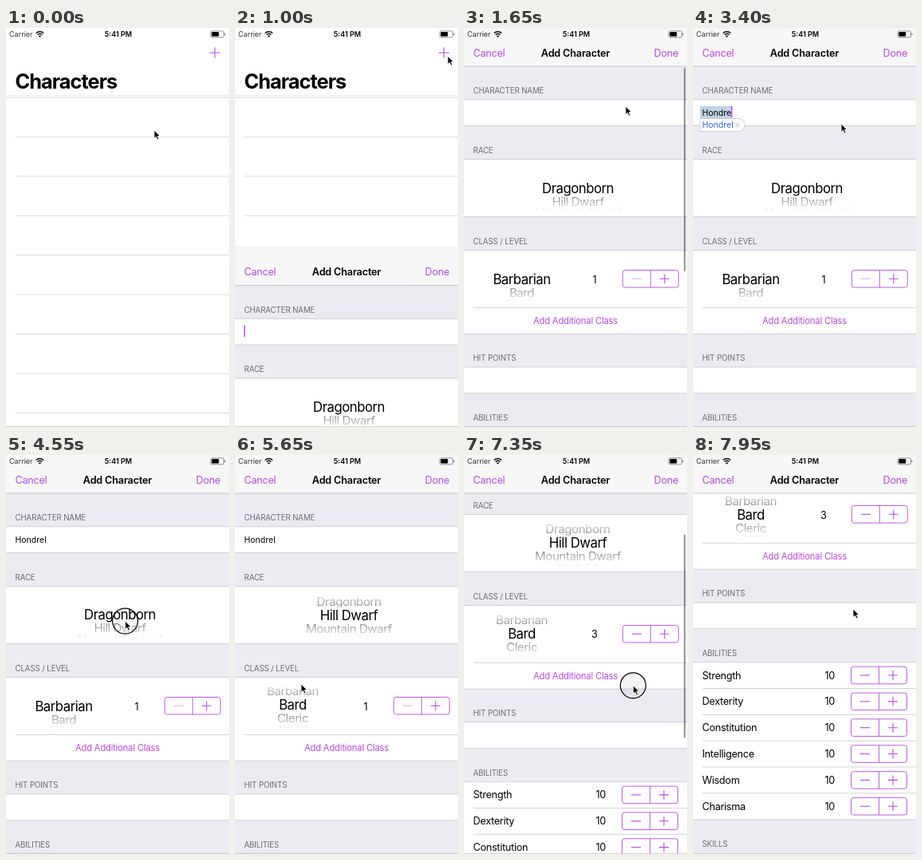
An HTML page that plays this animation: 280x500 px, repeating every 8 s.

```html
<!DOCTYPE html>
<html lang="en">
<head>
<meta charset="utf-8">
<title>Add Character</title>
<style>
html, body { margin: 0; width: 100%; height: 100%; overflow: hidden; background: #fff; }
svg { display: block; width: 280px; height: 500px; font-family: Inter, Roboto, sans-serif; }
text { white-space: pre; }
</style>
</head>
<body>
<svg id="stage" viewBox="0 0 280 500"></svg>
<script>
const LOOP = 8000;
const TINT = '#b84ae2', LINE = '#c8c7cc', HERO = 'Hondrel';
const stage = document.getElementById('stage');

function el(tag, attrs, parent = stage) {
  const node = document.createElementNS('http://www.w3.org/2000/svg', tag);
  set(node, attrs);
  parent.appendChild(node);
  return node;
}
function set(node, attrs) {
  for (const name in attrs) node.setAttribute(name, attrs[name]);
}
const show = (node, on) => set(node, { opacity: +on });
const move = (node, x, y) => set(node, { transform: `translate(${x} ${y})` });
const group = (parent, attrs = {}) => el('g', attrs, parent);
const rect = (parent, x, y, width, height, fill, attrs = {}) =>
  el('rect', { x, y, width, height, fill, ...attrs }, parent);
const path = (parent, d, stroke, width = 1, attrs = {}) =>
  el('path', { d, stroke, 'stroke-width': width, fill: 'none', ...attrs }, parent);
const rule = (parent, x, y, color = LINE) => rect(parent, x, y - 0.4, 280 - x, 0.8, color);

// Text whose capitals are vertically centred on cy.
function label(parent, str, x, cy, size, fill = '#000', spacing = 0, attrs = {}) {
  const node = el('text', { x, y: cy + size * 0.36, 'font-size': size, fill,
    'letter-spacing': spacing, ...attrs }, parent);
  node.textContent = str;
  return node;
}
const MID = { 'text-anchor': 'middle' }, END = { 'text-anchor': 'end' };

// Linear interpolation through [time, ...values] keys.
function track(keys, t) {
  if (t <= keys[0][0]) return keys[0].slice(1);
  for (let i = 1; i < keys.length; i++) {
    const a = keys[i - 1], b = keys[i];
    if (t < b[0]) {
      const p = (t - a[0]) / (b[0] - a[0]);
      return a.slice(1).map((v, j) => v + (b[j + 1] - v) * p);
    }
  }
  return keys[keys.length - 1].slice(1);
}
const within = (t, spans) => spans.some(([from, to]) => t >= from && t < to);

// Shared definitions for the picker wheels
const defs = el('defs', {});
const band = el('clipPath', { id: 'band' }, defs);
rect(band, -75, -10, 150, 20, '#000');
const rim = el('clipPath', { id: 'rim' }, defs);
rect(rim, -75, -35, 150, 25, '#000');
rect(rim, -75, 10, 150, 25, '#000');
const fade = el('linearGradient', { id: 'fade', x1: 0, y1: 0, x2: 0, y2: 1 }, defs);
[[0, 1], [0.1, 0.95], [0.36, 0.1], [0.64, 0.1], [0.9, 0.95], [1, 1]].forEach(([offset, alpha]) =>
  el('stop', { offset, 'stop-color': '#fff', 'stop-opacity': alpha }, fade));

function picker(parent, x, y, names) {
  const root = group(parent, { transform: `translate(${x} ${y})` });
  const outer = group(root, { 'clip-path': 'url(#rim)' });
  const word = (into, fill) => name => label(into, name, 0, 0, 16.8, fill, -0.5, MID);
  const far = names.map(word(outer, '#777'));
  rect(outer, -75, -35, 150, 70, 'url(#fade)');
  const near = names.map(word(group(root, { 'clip-path': 'url(#band)' }), '#000'));
  return pos => names.forEach((_, i) => {
    const k = i - pos, angle = k * 0.58;
    show(far[i], Math.abs(k) < 2.5);
    set(far[i], { transform: `translate(0 ${31 * Math.sin(angle)}) scale(0.9 ${Math.max(Math.cos(angle), 0.05)})` });
    move(near[i], 0, k * 20);
  });
}

function stepper(parent, x, cy) {
  const root = group(parent, { transform: `translate(${x} ${cy})` });
  const press = rect(root, 35, -10.8, 35, 21.6, TINT, { rx: 3, opacity: 0 });
  rect(root, 0, -10.8, 70, 21.6, 'none', { rx: 3, stroke: TINT, 'stroke-width': 0.9 });
  path(root, 'M35 -10.8v21.6', TINT, 0.9);
  const minus = path(root, 'M11.5 0h12', TINT, 1.1);
  path(root, 'M46.5 0h12M52.5 -6v12', TINT, 1.1);
  return { press, minus };
}

// Character list
const home = group(stage);
rect(home, 0, 0, 280, 500, '#fff');
label(home, 'Characters', 11.5, 66.5, 25.4, '#000', -1, { 'font-weight': 700 });
const plus = path(home, 'M255.5 31h13.5M262.2 24.2v13.5', TINT, 1.1);
rule(home, 0, 84.5, '#e6e6e8');
rule(home, 0, 87, LINE);
for (let i = 0; i < 8; i++) rule(home, 12, 136.3 + i * 49.45, '#d4d4d8');

// Form sheet
const sheet = group(stage);
rect(sheet, 0, 0, 280, 560, '#ebebf1');
const form = group(sheet);

function section(title, top, height) {
  label(form, title, 11.5, top - 11, 9.7, '#6d6d72', -0.1);
  rect(form, 0, top, 280, height, '#fff');
  rule(form, 0, top);
  rule(form, 0, top + height);
}
section('CHARACTER NAME', 89.8, 32.8);
section('RACE', 164.6, 71.8);
section('CLASS / LEVEL', 278.4, 104.8);
section('HIT POINTS', 425, 32.8);
section('ABILITIES', 499.8, 197.2);
label(form, 'SKILLS', 11.5, 728, 9.7, '#6d6d72', -0.1);

const mark = rect(form, 9, 98, 0, 15, '#bfd2e4');
const nameText = label(form, '', 11.5, 105.8, 10.5);
const caret = rect(form, 0, 98, 1.5, 14.5, TINT);
const bubble = group(form);
path(bubble, 'M9 113.5H57a8 8 0 0 1 0 16H9Z', '#c4c4c8', 0.8, { fill: '#fff' });
label(bubble, HERO, 11.5, 121.5, 10.5, '#2c6bd0');
path(bubble, 'M53.5 119l5 5M58.5 119l-5 5', '#aaa', 0.9);

const spinRace = picker(form, 143, 200.5, ['Dragonborn', 'Hill Dwarf', 'Mountain Dwarf', 'High Elf']);
const spinClass = picker(form, 72.5, 314.5, ['Barbarian', 'Bard', 'Cleric', 'Druid', 'Fighter']);
const level = label(form, '1', 164, 315, 12.7, '#000', 0, MID);
const levelStep = stepper(form, 199.3, 314.3);
rule(form, 12, 350.3);
label(form, 'Add Additional Class', 140, 367, 11.2, TINT, -0.17, MID);

['Strength', 'Dexterity', 'Constitution', 'Intelligence', 'Wisdom', 'Charisma'].forEach((name, i) => {
  const cy = 516 + i * 32.85;
  label(form, name, 11.5, cy, 12.7, '#000', -0.3);
  label(form, '10', 178, cy, 12.7, '#000', -0.3, END);
  stepper(form, 198.5, cy);
  if (i) rule(form, 12, cy - 16.4);
});

rect(sheet, 0, 0, 280, 48, '#f7f7f7');
rule(sheet, 0, 48, '#b9b9bc');
label(sheet, 'Cancel', 11.5, 31, 12.7, TINT, -0.3);
label(sheet, 'Add Character', 140, 31, 12.7, '#000', -0.2, { ...MID, 'font-weight': 600 });
label(sheet, 'Done', 269, 31, 12.7, TINT, -0.3, END);
const scrollBar = rect(sheet, 276, 50, 2.2, 255, '#000', { rx: 1.1 });

// Status bar
label(stage, 'Carrier', 4, 8, 9, '#333');
[6, 3.6].forEach(r => path(stage, `M${42.5 - r * 0.8} ${11.3 - r * 0.8}a${r * 1.13} ${r * 1.13} 0 0 1 ${r * 1.6} 0`, '#111', 1.4));
path(stage, 'M42.5 11.8l-1.7 -1.9q1.7 -1.4 3.4 0Z', 'none', 0, { fill: '#111' });
label(stage, '5:41 PM', 141, 8, 9, '#000', 0, { ...MID, 'font-weight': 600 });
rect(stage, 257, 3.8, 16.5, 8, 'none', { rx: 2, stroke: '#777', 'stroke-width': 0.8 });
rect(stage, 258.3, 5.1, 9, 5.4, '#000', { rx: 0.8 });
rect(stage, 274.3, 6.4, 1.2, 2.8, '#777', { rx: 0.6 });
rule(stage, 0, 499.3, '#c6c6c6');

// Pointer
const pointer = group(stage);
const touch = el('circle', { r: 16, fill: '#000', 'fill-opacity': 0.04, stroke: '#000', 'stroke-width': 1.2 }, pointer);
path(pointer, 'M0 0V10.4L2.4 8.2L4.1 12L6 11.2L4.3 7.5H7.5Z', '#fff', 0.9, { fill: '#000', 'stroke-linejoin': 'round' });

const POINTER = [
  [100, 186, 128], [350, 232, 72], [580, 267, 35],
  [1200, 267, 35], [1650, 203, 98], [1800, 186, 120],
  [3700, 186, 120], [4200, 150, 210],
  [4530, 150, 210], [4750, 146, 190], [5030, 86, 325],
  [5080, 86, 325], [5300, 83, 287],
  [5690, 83, 287], [6150, 256, 320],
  [6560, 256, 320], [6900, 221, 375],
  [7000, 221, 375], [7100, 220, 359], [7250, 216, 320],
  [7300, 216, 320], [7480, 203, 210], [7550, 201, 193]
];
const TAP_ADD = [600, 750], TAPS_LEVEL = [[6200, 6300], [6450, 6550]];
const PRESSES = [TAP_ADD, [4300, 4750], [5050, 5650], ...TAPS_LEVEL, [6950, 7480]];
const RACE = [[4540, 0], [4750, 0.85], [4950, 1]];
const CLASS = [[5080, 0], [5300, 1.1], [5650, 1.1], [5700, 1.1], [5850, 1]];
const SCROLL = [[7000, 0], [7100, 15], [7250, 55], [7300, 55], [7470, 172], [7550, 215], [7620, 233], [7700, 240]];
const BAR = [[1450, 0], [1550, 0.4], [2550, 0.4], [2850, 0], [6980, 0], [7050, 0.4], [7700, 0.4], [7940, 0]];
const KEYSTROKES = [2250, 2550, 2750, 2950, 3200, 3400, 3500];

function caretOn(t) {
  if (t < 2250) return t < 1500 || t >= 2000;
  if (t < 3650) return true;
  return t >= 3850 && (t - 3850) % 1067 < 700;
}

function draw(t) {
  const rise = t < 1000 ? 500 : t > 1550 ? 0 : 500 * Math.exp(-(t - 950) / 85);
  move(sheet, 0, rise);
  show(sheet, t >= 1000);
  set(plus, { opacity: within(t, [TAP_ADD]) ? 0.3 : 1 });

  const [scroll] = track(SCROLL, t);
  move(form, 0, -scroll);
  set(scrollBar, { y: 50 + scroll * 0.55, opacity: track(BAR, t)[0] });

  const typed = KEYSTROKES.filter(time => t >= time).length;
  const suggesting = within(t, [[KEYSTROKES[4], KEYSTROKES[6]]]);
  nameText.textContent = HERO.slice(0, typed);
  const end = 11.5 + (typed ? nameText.getComputedTextLength() : 0);
  set(caret, { x: end - 0.3, opacity: +caretOn(t) });
  set(mark, { width: end - 9, opacity: +suggesting });
  show(bubble, suggesting);

  spinRace(track(RACE, t)[0]);
  spinClass(track(CLASS, t)[0]);
  const count = 1 + TAPS_LEVEL.filter(([from]) => t >= from).length;
  level.textContent = count;
  set(levelStep.minus, { opacity: count > 1 ? 1 : 0.45 });
  set(levelStep.press, { opacity: within(t, TAPS_LEVEL) ? 0.2 : 0 });

  move(pointer, ...track(POINTER, t));
  show(touch, within(t, PRESSES));
}

const start = performance.now();
function tick() {
  draw((performance.now() - start) % LOOP);
  requestAnimationFrame(tick);
}
tick();
</script>
</body>
</html>
```
